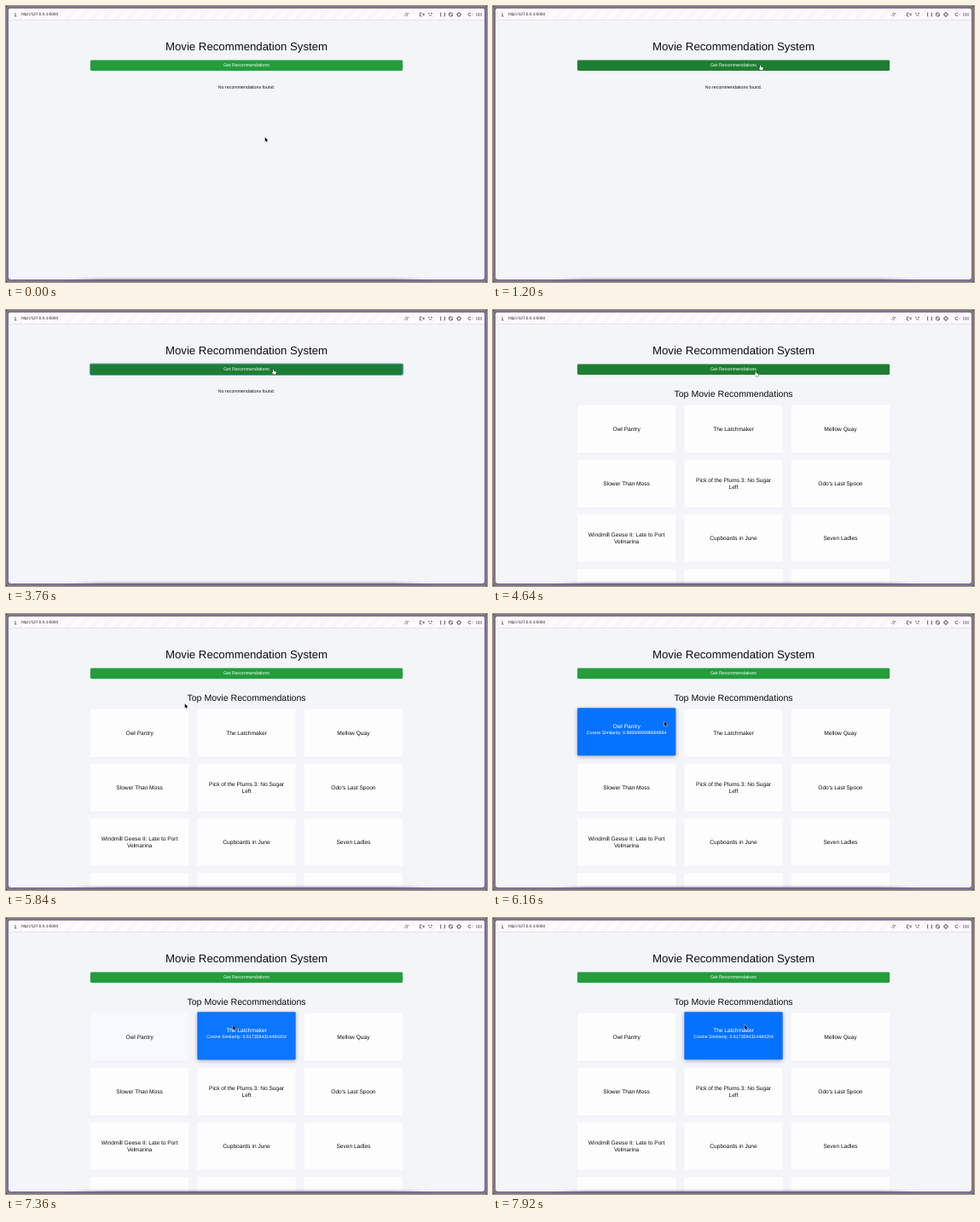
These frames come from a looping animation (564 by 324 pixels, 8000 ms). An HTML page:

```html
<!DOCTYPE html>
<html lang="en">
<head>
<meta charset="utf-8">
<title>Movie Recommendation System</title>
<style>
  html, body { margin: 0; width: 100%; height: 100%; overflow: hidden; background: #1c1a24; }
  #stage { position: relative; width: 564px; height: 324px; overflow: hidden; border-radius: 2px;
    background: #7b738f; color: #0c0d10; font: 16px/24px "Liberation Sans", Arial, sans-serif;
    text-rendering: geometricPrecision; white-space: nowrap; }
  #stage div, #stage svg { position: absolute; box-sizing: border-box; }
  #page { left: 3px; top: 3px; width: 558px; height: 318px; border-radius: 3px; overflow: hidden; background: #f4f5f9; }
  #bar { left: 0; top: 0; width: 558px; height: 13.5px; border-bottom: .6px solid #e6e0ea;
    background: repeating-linear-gradient(135deg, #fefcfe 0 5px, #fbf6fa 5px 10px); }
  #url { left: 15px; top: 2.8px; font-size: 4.7px; line-height: 8px; color: #1c1826; }
  /* Laid out at full browser size, then shrunk to the stage */
  #view { left: 0; top: 0; width: 1690px; height: 964px; transform-origin: 0 0;
    transform: translate(.15px) scale(.33); }
  .mid { left: 0; width: 1690px; text-align: center; }
  #btn { left: 290px; top: 183px; width: 1110px; height: 38px; border-radius: 4px;
    color: #fff; text-align: center; line-height: 38px; }
  .card { width: 350px; height: 170px; border-radius: 4px; display: flex; flex-direction: column;
    justify-content: center; text-align: center; }
  .card b { font-weight: 400; font-size: 20px; }
  .card span { margin-bottom: 16px; }
  #shade { left: 68px; top: 319.5px; width: 430px; height: 2.5px; filter: blur(1px); opacity: .5;
    background: linear-gradient(90deg, #4d4a5800, #4d4a58 10% 90%, #4d4a5800); }
  #icons { left: 0; top: 0; }
</style>
</head>
<body>
<div id="stage">
  <div id="page">
    <div id="bar"><div id="url">http://127.0.0.1:5000</div></div>
    <div id="view">
      <div class="mid" style="top:111px;font-size:40px;line-height:48px">Movie Recommendation System</div>
      <div id="btn">Get Recommendations</div>
      <div id="none" class="mid" style="top:270px">No recommendations found.</div>
      <div id="results">
        <div class="mid" style="top:269px;font-size:32px;line-height:38px">Top Movie Recommendations</div>
      </div>
    </div>
  </div>
  <div id="shade"></div>
  <svg id="icons" width="564" height="324" fill="none" stroke="#3a3446" stroke-width=".7">
    <path d="M11 8v4M10 12h2.4M467 11.5l1.5-1.5M470 10l2-2M468 9l2-1M469 12l2-1.5
      M485.500 8v4M485.500 8h2M485.500 12h2M488 9l2 2M490 8.500v3M495 8.500h2M498 8.500h2M496 10l1.500 1.500 2-1.500
      M510.500 8h-1v4h1M513.500 8h1v4h-1M519.500 8l4 4M531 7v1.500M531 11.500v1.500M528 10h1.500M532.500 10h1.500
      M552 8v4M554.500 8v4M557 8v4"/>
    <circle cx="521.500" cy="10" r="2.200"/>
    <circle cx="531" cy="10" r="2"/>
    <path d="M545 8.500h-1.500a1.500 1.500 0 0 0 0 3h1.500M547 9.500v1"/>
    <g id="cursor" stroke="#fff" stroke-width=".7" stroke-linejoin="round" paint-order="stroke">
      <path id="arrow" fill="#000" d="M0 0V4.700L1.100 3.700 1.800 5.300 2.600 4.900 1.900 3.400H3.300Z"/>
      <path id="hand" fill="#fff" stroke="#111" d="M0 .4Q.5-.2 1 .4V2L3.100 2.500Q3.700 2.700 3.500 3.500L3 5.400H.4L-1.200 3.300Q-1 2.600 0 3.200Z"/>
    </g>
  </svg>
</div>
<script>
const $ = id => document.getElementById(id);
const LOOP = 8000, LOADED = 3840, CLICK = 1440;
const BTN_IN = 920, BTN_OUT = 4700, SWAP = 7125;

const titles = ["Owl Pantry", "The Latchmaker", "Mellow Quay", "Slower Than Moss",
  "Pick of the Plums 3: No Sugar<br>Left", "Odo's Last Spoon",
  "Windmill Geese II: Late to Port<br>Velmarina", "Cupboards in June", "Seven Ladles", "", "", ""];

const cards = titles.map((title, i) => {
  const card = document.createElement("div");
  card.className = "card";
  card.style.left = 290 + i % 3 * 380 + "px";
  card.style.top = 330 + Math.floor(i / 3) * 194 + "px";
  card.innerHTML = `<b>${title}</b><span hidden></span>`;
  $("results").append(card);
  return card;
});

// Hovered cards: index, enter time, leave time, score
const hovers = [[0, 5900, SWAP, "0.9999999999999994"], [1, SWAP, Infinity, "0.9173594314484204"]];
for (const [i, , , score] of hovers)
  cards[i].lastChild.textContent = "Cosine Similarity: " + score;

// Cursor stops: time, x, y
const path = [[0, 303.7, 154], [160, 303.7, 154], [900, 311.5, 77], [1200, 313, 69.3],
  [3760, 313, 69.6], [4080, 313, 69.6], [4240, 313.5, 70], [4560, 313.5, 70], [5120, 209.7, 105.2],
  [5840, 209.7, 105.2], [5920, 207, 113], [6160, 201, 126.3], [6480, 192, 129], [6640, 192, 129],
  [7080, 210, 127], [7200, 243, 126.3], [7440, 274, 126], [7920, 295.2, 125.6], [LOOP, 295.2, 125.6]];

const clamp = v => Math.max(0, Math.min(1, v));

// CSS "ease": cubic-bezier(.25, .1, .25, 1)
function ease(x) {
  let lo = 0, hi = 1, s = x;
  for (let i = 0; i < 20; i++) {
    s = (lo + hi) / 2;
    if (.75 * s * (1 - s) + s ** 3 < x) lo = s; else hi = s;
  }
  return .3 * s * (1 - s) ** 2 + 3 * s * s * (1 - s) + s ** 3;
}

const fade = (t, start, end, ms) => ease(clamp((t - start) / ms)) - ease(clamp((t - end) / ms));
const mix = (to, from, p) => `color-mix(in srgb, ${to} ${p * 100}%, ${from})`;

function cursorAt(t) {
  const i = path.findIndex(p => p[0] > t);
  const [t0, x0, y0] = path[i - 1], [t1, x1, y1] = path[i];
  const u = (t - t0) / (t1 - t0), s = u * u * (3 - 2 * u);
  return [x0 + (x1 - x0) * s, y0 + (y1 - y0) * s];
}

function styleCard(card, p, on) {
  card.style.background = mix("#0472ff", "#fdfdfe", p);
  card.style.color = on ? "#fff" : "";
  card.style.transform = `translateY(${-5 * p}px)`;
  card.style.boxShadow = `0 ${2 + 2 * p}px ${4 + 11 * p}px rgba(0,0,0,${.02 + .28 * p})`;
  card.lastChild.hidden = !on;
}

function draw(t) {
  const loaded = t >= LOADED;
  $("none").hidden = loaded;
  $("results").hidden = !loaded;

  const ring = loaded ? 0 : fade(t, CLICK, Infinity, 150);
  $("btn").style.background = mix("#1d7e31", "#249d3c", fade(t, BTN_IN, BTN_OUT, 150));
  $("btn").style.boxShadow = ring ? `0 0 0 3px rgba(74,144,217,${.85 * ring})` : "none";

  for (const [i, start, end] of hovers)
    styleCard(cards[i], fade(t, start, end, 300), t >= start && t < end);

  const onBtn = t >= BTN_IN && t < BTN_OUT;
  $("arrow").style.display = onBtn ? "none" : "";
  $("hand").style.display = onBtn ? "" : "none";
  $("cursor").setAttribute("transform", `translate(${cursorAt(t)}) scale(1.1)`);
}

function tick() {
  draw(performance.now() % LOOP);
  requestAnimationFrame(tick);
}
cards.forEach(card => styleCard(card, 0, false));
tick();
</script>
</body>
</html>
```
